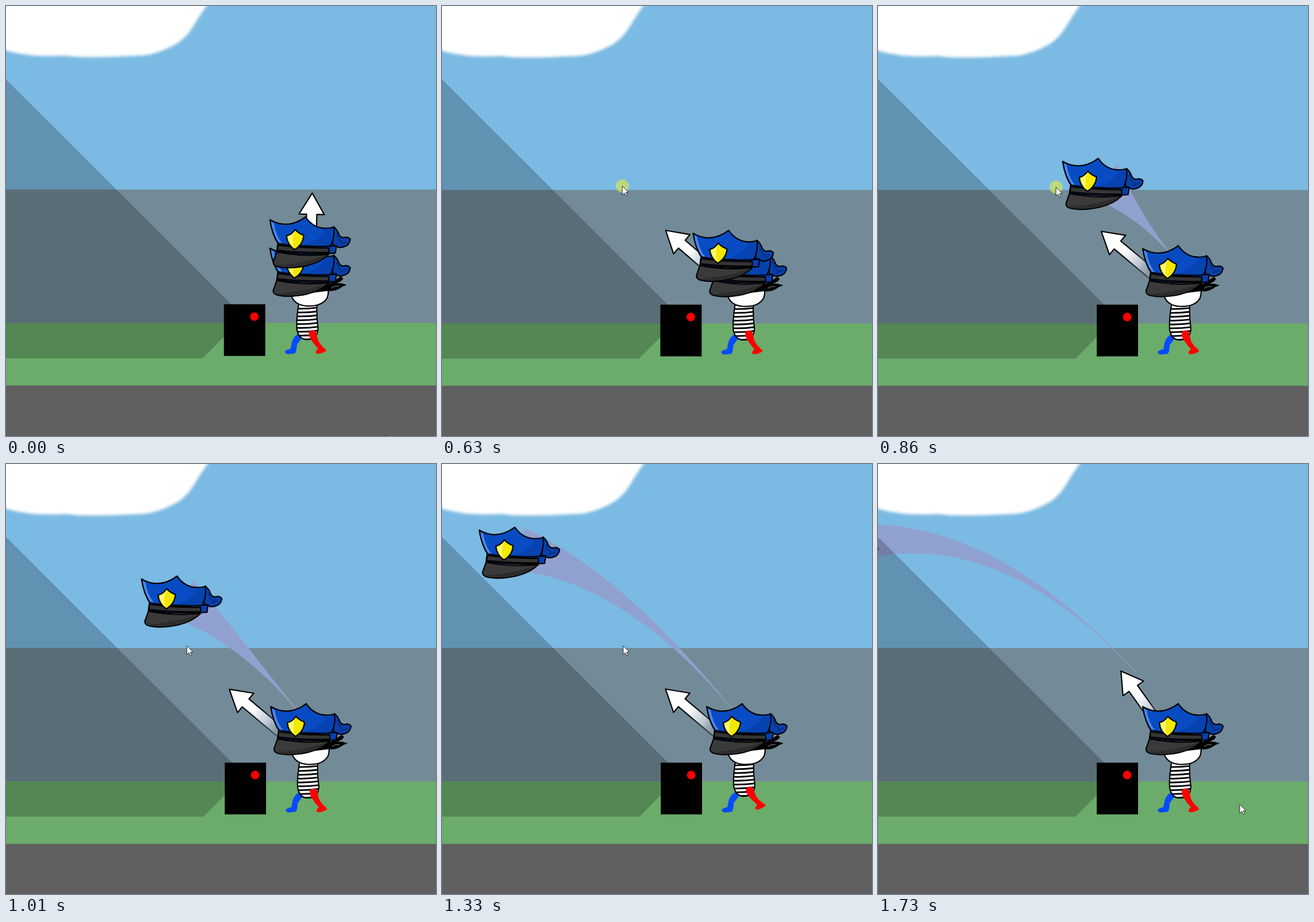
Recreate the animation shown at these times as an HTML page. Size 749 by 748 pixels, loop 1810 ms.

```html
<!DOCTYPE html>
<html lang="en">
<head>
<meta charset="utf-8">
<title>Hat throw</title>
<style>
  html, body { margin: 0; width: 100%; height: 100%; overflow: hidden; background: #7bbae2; }
  svg { display: block; width: 100%; height: 100%; }
  .ink { stroke: #000; stroke-width: 2.2; stroke-linejoin: round; stroke-linecap: round; }
</style>
</head>
<body>
<svg viewBox="0 0 749 748">
  <defs>
    <filter id="soft" x="-5%" y="-10%" width="110%" height="120%"><feGaussianBlur stdDeviation="2.8"/></filter>
    <linearGradient id="shaftFill" gradientUnits="userSpaceOnUse" x1="0" y1="-185" x2="0" y2="-68">
      <stop offset=".47" stop-color="#fff"/>
      <stop offset=".75" stop-color="#ccd4de" stop-opacity=".85"/>
      <stop offset="1" stop-color="#9ca8b2" stop-opacity=".2"/>
    </linearGradient>
    <linearGradient id="shaftInk" gradientUnits="userSpaceOnUse" x1="0" y1="-185" x2="0" y2="-68">
      <stop offset=".5"/>
      <stop offset="1" stop-opacity=".45"/>
    </linearGradient>
    <clipPath id="torso"><path d="M511 519Q507 545 508 563Q511 581 526 581Q544 581 545 561Q542 540 543 519Z"/></clipPath>

    <g id="hat">
      <path class="ink" fill="#083fa8" d="M572 434Q579 440 581 447Q584 454 590 453Q597 451 601 456Q600 465 593 468Q586 471 581 470Q576 468 570 465Z"/>
      <path fill="none" stroke="#05286e" stroke-width="1.4" d="M577 446Q580 457 587 461M583 464L594 460"/>
      <path class="ink" fill="#084bc2" d="M461 422Q492 440 523 417Q541 443 572 435Q575 452 566 469L477 466Q465 449 461 422Z"/>
      <path fill="#0642b0" d="M571 437Q573 452 564 469L522 466Q553 456 558 438Z"/>
      <path fill="#4b86e8" d="M463 425L468 428Q471 449 483 464L478 464Q466 447 463 425Z"/>
      <path class="ink" fill="#083fae" d="M475 463Q515 471 564 468L577 467L575 480Q520 484 473 477Z"/>
      <path class="ink" fill="#3a3a3a" d="M473 478Q518 487 564 482Q550 496 525 502Q496 508 476 504Q466 502 467 495Z"/>
      <path fill="#2c2c2c" d="M472 501Q515 499 558 484Q548 496 522 501Q495 507 472 501Z"/>
      <path class="ink" fill="#353535" d="M475 466Q518 472 564 471L564 479Q515 480 474 475Z"/>
      <path class="ink" fill="#f3e900" d="M505 439Q511 446 520 449Q519 465 504 474Q491 465 490 450Q499 448 505 439Z"/>
      <path fill="#fff675" d="M504 442Q499 449 492 451Q494 463 503 471Q498 457 504 442Z"/>
    </g>

    <g id="head">
      <path d="M528 503L563 484Q574 479 585 471L589 475Q585 481 576 483Q586 482 595 486Q588 488 583 492Q572 498 562 496L540 504Z"/>
      <path fill="none" stroke="#8d9ca5" d="M568 491Q574 487 581 488"/>
      <path class="ink" fill="#fff" d="M498 503Q503 521 525 522.5Q552 524 561 508Q563 502 563 495L530 499Z"/>
    </g>
  </defs>

  <g id="scene">
    <path fill="#7bbae2" d="M-5-5H755V325H-5Z"/>
    <path fill="#738b98" d="M-5 320H755V553H-5Z"/>
    <path fill="#6bac6a" d="M-5 552.3H755V662H-5Z"/>
    <path fill="#606060" d="M-5 660.8H755V755H-5Z"/>
    <path filter="url(#soft)" fill="#fff" d="M-20-20H363L351 0Q340 15 330 32Q315 58 294 69Q262 86 235 87Q130 92 105 87Q55 89 35 85Q10 82-4 76L-20 70Z"/>
    <path id="trail" fill="#91a1cf"/>
    <path fill="#000" fill-opacity=".215" d="M-5 122L394 519.5V563L344 613.5H-5Z"/>
    <path d="M381 519.5H453V609.5H381Z"/>
    <circle cx="434" cy="541" r="7.4" fill="#f00"/>

    <g id="arrow">
      <path d="M0-184L22-147H9V-68H-9V-147H-22Z" fill="url(#shaftFill)"/>
      <path d="M-9-68V-147H-22L0-184L22-147H9V-68" fill="none" stroke="url(#shaftInk)" stroke-width="2.2" stroke-linejoin="round"/>
    </g>

    <path fill="#074bff" d="M510 571Q501 577 499 587L497 597Q488 599 487 602Q488 607 496 606L505 605Q508 600 508 590L517 578Z"/>
    <g id="body">
      <g clip-path="url(#torso)">
        <path fill="#fff" d="M500 515H550V585H500Z"/>
        <path id="stripes" fill="none" stroke="#000" stroke-width="2.8"/>
      </g>
      <path class="ink" fill="none" d="M511 521Q507 545 508 563Q511 581 526 581Q544 581 545 561Q542 540 543 521"/>
    </g>
    <path id="redLeg" fill="#f00" d="M529 568Q533 562 541 566L545 582Q549 591 558 598Q561 601 555 603Q548 607 541 605Q540 601 545 597Q534 585 529 574Z"/>
    <use href="#head"/>
    <use href="#hat"/>
    <use href="#hat" id="thrown"/>
  </g>

  <g id="cursor">
    <circle id="press" r="11.3" fill="#dfe84a" fill-opacity=".65"/>
    <path fill="#fff" stroke="#222" d="M0 0V15.6L3.7 12.2L6.2 17.6L8.6 16.5L6.2 11.2H10.8Z"/>
  </g>
</svg>

<script>
  const LOOP = 1810;
  const THROW = 8.28;
  const starts = [0, 70, 150, 230, 310, 390, 460, 540, 630, 700, 780, 860, 940, 1010];
  while (starts.length < 23) starts.push(starts.at(-1) + 80);

  // step, x, y
  const cursorKeys = [
    [0, 659, 746], [1, 655, 790], [2, 630, 725], [3, 570, 600], [4, 470, 455], [5, 385, 355],
    [6, 328, 308], [7, 311, 300], [8, 314, 313], [11, 310, 315], [13, 315, 316],
    [20, 316, 316], [21, 400, 385], [22, 630, 592]
  ];
  // step, degrees from upright
  const aimKeys = [
    [0, 1.5], [1, 20], [2, 24], [3, 14], [4, -6], [5, -25], [6, -39], [7, -46],
    [8, -49.4], [11, -50.1], [20, -49.8], [21, -48], [22, -35.5]
  ];

  const $ = id => document.getElementById(id);
  const move = (id, x, y) => $(id).setAttribute('transform', `translate(${x} ${y})`);

  function sample(keys, k) {
    const i = Math.max(1, keys.findIndex(key => key[0] >= k));
    const [a, b] = [keys[i - 1], keys[i]];
    const u = (k - a[0]) / (b[0] - a[0]);
    return a.slice(1).map((v, j) => v + (b[j + 1] - v) * u);
  }

  // Ballistic offset of the thrown hat from the worn one, and its speed
  function flight(k) {
    const d = k - 13;
    return {
      x: -225 - 42.8 * d,
      y: -222 - 30.5 * d + 2.31 * d * d,
      vx: -42.8,
      vy: -30.5 + 4.62 * d
    };
  }

  function trailPath(k) {
    if (k <= THROW) return '';
    const tail = k > 21 ? 9.6 : THROW - .2;
    const left = [], right = [];
    for (let i = 0; i <= 40; i++) {
      const u = i / 40;
      const { x, y, vx, vy } = flight(tail + (k - tail) * u);
      const half = (.4 + 37.6 * u ** 1.9) / Math.hypot(vx, vy);
      left.push([530 + x - vy * half, 455 + y + vx * half]);
      right.unshift([530 + x + vy * half, 455 + y - vx * half]);
    }
    return 'M' + left.concat(right).map(p => p.map(v => v.toFixed(1)).join(' ')).join('L') + 'Z';
  }

  function setStep(stepping) {
    move('body', 0, stepping ? -3 : 0);
    $('redLeg').setAttribute('transform', stepping ? 'translate(0 -3) rotate(-8 536 567)' : '');
  }

  function draw(t) {
    const k = starts.findLastIndex(s => s <= t);
    const [cx, cy] = sample(cursorKeys, k);
    const [aim] = sample(aimKeys, k);
    const hat = k < 8 ? { x: 0, y: -49.5 } : flight(Math.max(k, THROW));

    move('scene', k < 8 ? -1.4 : k === 8 ? -.7 : 0, k < 8 ? -.7 : 0);
    move('cursor', cx, cy);
    $('press').setAttribute('opacity', k < 8 || k > 12 ? 0 : k === 12 ? .5 : 1);
    $('arrow').setAttribute('transform', `translate(530 510) rotate(${aim})`);
    move('thrown', Math.max(hat.x, -601), hat.y);
    $('trail').setAttribute('d', trailPath(k));
    setStep(k === 17);
  }

  $('stripes').setAttribute('d', Array.from({ length: 9 }, (_, i) =>
    `M505 ${527 + i * 6.7}Q526 ${528 + i * 6.7} 549 ${524.5 + i * 6.7}`).join(''));

  const origin = performance.now();
  function tick() {
    draw((performance.now() - origin) % LOOP);
    requestAnimationFrame(tick);
  }
  tick();
</script>
</body>
</html>
```
